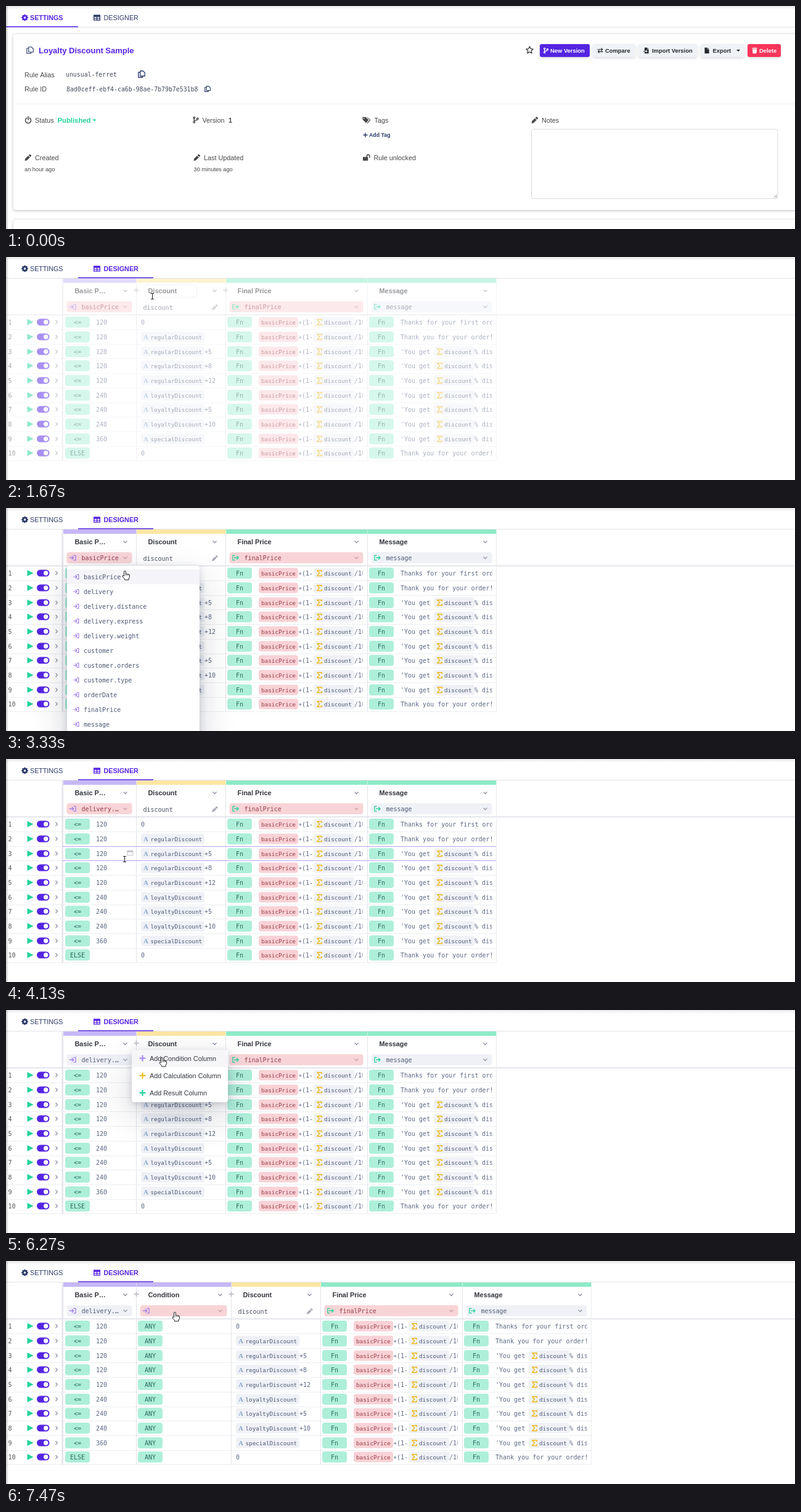
These frames come from a looping animation (1280x363 px, 8000 ms). An HTML page with a canvas:

```html
<!DOCTYPE html>
<html lang="en">
<head>
<meta charset="utf-8">
<title>Rule designer</title>
<style>
html, body { margin: 0; width: 100%; height: 100%; overflow: hidden; background: #fff; }
canvas { display: block; width: 100%; height: 100%; }
</style>
</head>
<body>
<canvas id="stage" width="1280" height="363"></canvas>
<script>
const c = document.getElementById('stage').getContext('2d');
const SANS = '"Liberation Sans", Arial, sans-serif';
const MONO = '"DejaVu Sans Mono", monospace';
const PURPLE = '#5525e2', NAVY = '#2b3a67', GREEN = '#22d39a', INK = '#474747', CODE = '#5c6784';
const LOOP = 8000, FPS = 15;

// Icons on a 16 unit grid: [filled path, stroked path]
const ICONS = {
  table: ['M0 1h16v14H0z M2 6h5v3H2z M9 6h5v3H9z M2 10.500h5v2.500H2z M9 10.500h5v2.500H9z', ''],
  clone: ['', 'M5 1h6l4 4v7H5z M5 4H1v11h9v-3'],
  branch: ['', 'M6 3a2 2 0 1 0-4 0a2 2 0 1 0 4 0 M6 13a2 2 0 1 0-4 0a2 2 0 1 0 4 0 M14 5a2 2 0 1 0-4 0a2 2 0 1 0 4 0 M4 5v6 M12 7c0 3-8 1-8 4'],
  star: ['', 'M8 1l2.100 4.600 5 .6-3.700 3.400 1 5L8 12.100 3.600 14.600l1-5L.9 6.200l5-.6z'],
  swap: ['', 'M1 5h13 M11 2l3 3-3 3 M15 11H2 M5 8l-3 3 3 3'],
  load: ['M3 0h7v5h4v11H3v-5h4v3l4-4-4-4v3H3z M11 0l3 4h-3z M0 9h3v2H0z', ''],
  file: ['M2 0h7v5h5v11H2z M10 0l4 4h-4z', ''],
  trash: ['M1 1h4l1-1h4l1 1h4v2H1z M2 4h12l-1 12H3z', ''],
  power: ['', 'M5 3a6 6 0 1 0 6 0 M8 0v7'],
  pencil: ['M0 16l1-5 7-7 4 4-7 7z M9 3l2-2q1-1 2 0l2 2q1 1 0 2l-2 2z', ''],
  tags: ['M0 2h6l6 6-5 6-7-7z M2 5a1 1 0 1 0 2 0a1 1 0 1 0-2 0z M8 2h1l7 6-6 7-1-1 5-6z', ''],
  unlock: ['M0 7h11v8H0z', 'M8.500 7V5a3 3 0 0 1 6 0v3'],
  input: ['', 'M0 8h9 M6 4l4 4-4 4 M10 2h5v12h-5'],
  output: ['', 'M6 2H1v12h5 M5 8h10 M11 4l4 4-4 4'],
  calendar: ['M1 2h14v4H1z', 'M1 2h14v12H1z'],
  sigma: ['', 'M14 4V1H2l6 7-6 7h12v-3'],
};
for (const k in ICONS) ICONS[k] = ICONS[k].map(d => new Path2D(d));

function icon(name, x, y, size, color, weight = 2) {
  const [fill, line] = ICONS[name];
  c.save();
  c.translate(x - size / 2, y - size / 2);
  c.scale(size / 16, size / 16);
  c.fillStyle = c.strokeStyle = color;
  c.lineWidth = weight;
  c.lineJoin = c.lineCap = 'round';
  c.fill(fill, 'evenodd');
  c.stroke(line);
  c.restore();
}

function text(s, x, y, color = INK, size = 10.8, weight = 400, align = 'left', font = SANS) {
  c.font = `${weight} ${size}px ${font}`;
  c.fillStyle = color;
  c.textAlign = align;
  c.fillText(s, x, y);
}
const bold = (s, x, y, color, size = 10.8) => text(s, x, y, color, size, 700);
const mono = (s, x, y, color = CODE, size = 10, align) => text(s, x, y, color, size, 400, align, MONO);

function box(x, y, w, h, color) {
  c.fillStyle = color;
  c.fillRect(x, y, w, h);
}

function pill(x, y, w, h, color, r = 4) {
  c.fillStyle = color;
  c.beginPath();
  c.roundRect(x, y, w, h, r);
  c.fill();
}

function frame(x, y, w, h, color, r = 3) {
  c.strokeStyle = color;
  c.lineWidth = 1;
  c.beginPath();
  c.roundRect(x, y, w, h, r);
  c.stroke();
}

function raised(x, y, w, h, color, blur, dy, shade, r) {
  c.save();
  c.shadowColor = `rgba(30,35,60,${shade})`;
  c.shadowBlur = blur;
  c.shadowOffsetY = dy;
  pill(x, y, w, h, color, r);
  c.restore();
}

function panel(x, y, w, h) {
  raised(x, y, w, h, '#fff', 60, 22, .2, 4);
  raised(x, y, w, h, '#fff', 12, 3, .2, 4);
}

function line(points, color, width = 1) {
  c.strokeStyle = color;
  c.lineWidth = width;
  c.beginPath();
  points.forEach(([x, y], i) => i ? c.lineTo(x, y) : c.moveTo(x, y));
  c.stroke();
}

const caret = (x, y, color) => line([[x - 3, y - 1.5], [x, y + 1.5], [x + 3, y - 1.5]], color, 1.3);

function plus(x, y, r, color, width = 2) {
  line([[x - r, y], [x + r, y]], color, width);
  line([[x, y - r], [x, y + r]], color, width);
}

function wedge(x, y, color) {
  c.fillStyle = color;
  c.beginPath();
  c.moveTo(x - 3, y - 1.5);
  c.lineTo(x + 3, y - 1.5);
  c.lineTo(x, y + 1.8);
  c.fill();
}

function gear(x, y, color) {
  for (let i = 0; i < 4; i++) {
    const a = i * Math.PI / 4, dx = Math.cos(a) * 5.3, dy = Math.sin(a) * 5.3;
    line([[x - dx, y - dy], [x + dx, y + dy]], color, 2.3);
  }
  c.fillStyle = color;
  c.beginPath();
  c.arc(x, y, 4.2, 0, 7);
  c.fill();
  c.fillStyle = '#fff';
  c.beginPath();
  c.arc(x, y, 1.7, 0, 7);
  c.fill();
}

const clamp = v => Math.max(0, Math.min(1, v));
const mix = (a, b, k) => `rgb(${a.map((v, i) => Math.round(v + (b[i] - v) * k))})`;
const RED = [248, 212, 215], GREY = [239, 241, 246];

// Pointer path: [tick, x, y, shape]
const PATH = [
  [1, 1272, 352, 'arrow'], [10, 240, 120, 'arrow'], [11, 180, 62, 'arrow'], [13, 203, 33, 'arrow'],
  [14, 188, 20, 'hand'], [16, 168, 12, 'hand'], [20, 168, 12, 'arrow'], [24, 237, 64, 'beam'],
  [27, 237, 64, 'beam'], [33, 203, 79, 'hand'], [36, 194, 82, 'hand'], [47, 194, 82, 'hand'],
  [56, 192, 158, 'hand'], [62, 192, 163, 'beam'], [68, 192, 163, 'beam'], [70, 192, 168, 'beam'],
  [74, 222, 122, 'beam'], [77, 216, 66, 'arrow'], [79, 211, 54, 'hand'], [85, 211, 54, 'hand'],
  [94, 253, 77, 'hand'], [96, 254, 78, 'hand'], [97, 253, 77, 'hand'], [99, 253, 77, 'hand'],
  [112, 274, 83, 'hand'],
];

function pointerAt(n) {
  let i = PATH.length - 1;
  while (i > 0 && PATH[i][0] > n) i--;
  const [t, x, y, shape] = PATH[i], next = PATH[i + 1];
  if (!next) return { x, y, shape };
  const k = clamp((n - t) / (next[0] - t)), e = k * k * (3 - 2 * k);
  return { x: x + (next[1] - x) * e, y: y + (next[2] - y) * e, shape };
}

const ARROW = new Path2D('M0 0v13l3-2.800 2 4.600 2-.9-2-4.400h4.200z');
const HAND = new Path2D('M-1.500 1Q0-.5 1.300 1V5.500Q2.500 4.600 3.600 5.800 5 5 5.900 6.400 7.300 6 7.500 7.500V10.500L6 13V15H-.5V13.500L-4 9.500Q-4.500 7.300-2.500 8L-1.500 9z');

function drawPointer({ x, y, shape }) {
  c.save();
  c.translate(Math.round(x), Math.round(y));
  if (shape === 'beam') {
    line([[-2, -4.5], [3, -4.5]], '#222');
    line([[-2, 4.5], [3, 4.5]], '#222');
    line([[.5, -4.5], [.5, 4.5]], '#222');
  } else {
    const path = shape === 'hand' ? HAND : ARROW;
    c.fillStyle = '#fff';
    c.strokeStyle = '#222';
    c.lineWidth = 1;
    c.fill(path);
    c.stroke(path);
    if (shape === 'hand') {
      for (const dx of [1.3, 3.6, 5.8]) line([[dx, 5.5], [dx, 8]], '#333', .8);
    }
  }
  c.restore();
}

function drawTabs(designer, hover) {
  if (hover) box(117, 4, 122, 29, '#f7f7f9');
  box(0, 34, 1280, 1, '#e2e3e6');
  const [a, b] = designer ? [NAVY, PURPLE] : [PURPLE, NAVY];
  gear(30.5, 19, a);
  text('SETTINGS', 39, 23, a, 10.7, designer ? 400 : 700);
  icon('table', 147.5, 19, 11, b);
  text('DESIGNER', 158.5, 23, b, 10.8, designer ? 700 : 400);
  box(designer ? 117 : 0, 33, designer ? 122 : 117, 1.5, PURPLE);
}

function drawEdges() {
  let g = c.createLinearGradient(0, 0, 0, 6);
  g.addColorStop(0, 'rgba(0,0,0,.09)');
  g.addColorStop(1, 'rgba(0,0,0,0)');
  box(0, 0, 1280, 6, g);
  g = c.createLinearGradient(0, 0, 4, 0);
  g.addColorStop(0, 'rgba(0,0,0,.22)');
  g.addColorStop(1, 'rgba(0,0,0,0)');
  box(0, 0, 4, 363, g);
}

function button(x, w, label, tx, name, ix, bg = '#eff2f6', fg = '#24272e') {
  raised(x, 62, w, 21, bg, 4, 2, .16, 3);
  icon(name, ix, 72.5, 9.5, fg);
  bold(label, tx, 76, fg, 9.4);
}

function drawSettings() {
  raised(12, 46, 1290, 286, '#fff', 5, 1, .3, 4);
  raised(12, 348, 1290, 40, '#fff', 5, 1, .3, 4);
  icon('clone', 39, 72, 12, NAVY, 1.5);
  bold('Loyalty Discount Sample', 53, 77, PURPLE, 13);
  icon('star', 849.5, 71.5, 13, '#333', 1.5);
  button(866, 81, 'New Version', 883, 'branch', 876, PURPLE, '#fff');
  button(952, 69, 'Compare', 972, 'swap', 964);
  button(1026, 95, 'Import Version', 1048, 'load', 1039);
  button(1127, 71, 'Export', 1146.5, 'file', 1137);
  wedge(1188, 72.5, '#24272e');
  button(1203, 54, 'Delete', 1222, 'trash', 1214.5, '#f8355b', '#fff');

  text('Rule Alias', 30, 116);
  mono('unusual-ferret', 97, 115, '#454b5c', 9.85);
  icon('clone', 220, 111, 12, NAVY, 1.7);
  text('Rule ID', 30, 139);
  mono('8ad0ceff-ebf4-ca6b-98ae-7b79b7e531b8', 98, 138.5, '#454b5c', 9.85);
  icon('clone', 327, 135, 10, NAVY, 1.8);
  box(12, 159, 1268, 1, '#f0f0f2');

  icon('power', 36, 186, 12, INK);
  text('Status', 47, 190);
  bold('Published', 83.5, 190, GREEN, 11.3);
  wedge(143.5, 186, GREEN);
  icon('branch', 308, 185.5, 11, INK);
  text('Version', 318.5, 189.5);
  bold('1', 361, 189.5, INK);
  icon('tags', 585, 185.5, 13, INK);
  text('Tags', 597.5, 189.5);
  plus(583, 210, 3.5, NAVY, 1.5);
  bold('Add Tag', 589, 213, NAVY, 8.8);
  icon('pencil', 858, 185.5, 11, INK);
  text('Notes', 869, 189.5);
  frame(852.5, 200.5, 399.5, 113, '#d9dade');
  line([[1246, 312], [1251, 307]], '#888');
  line([[1249, 312], [1251, 310]], '#888');

  icon('pencil', 36, 246.5, 11, INK);
  text('Created', 47, 250.5);
  text('an hour ago', 30, 268.5, INK, 9.25);
  icon('pencil', 310, 246.5, 11, INK);
  text('Last Updated', 321, 250.5);
  text('30 minutes ago', 304.5, 268.5, INK, 9.25);
  icon('unlock', 585, 246.5, 12, INK);
  text('Rule unlocked', 596.5, 250.5);
}

const ROW = 23.7, TOP = 94.3;
const DISCOUNTS = ['0', 'regular', 'regular+5', 'regular+8', 'regular+12', 'loyalty', 'loyalty+5', 'loyalty+10', 'special', '0'];

function tag(label, x, y) {
  pill(x, y - 9, 40, 18, '#aeefd9');
  mono(label, x + 20, y + 3.6, '#2d6b60', 10, 'center');
}

function sumChip(x, y) {
  pill(x, y - 8.5, 66, 17, '#eff1f6');
  icon('sigma', x + 9.5, y, 10, '#efb91c', 2.4);
  mono('discount', x + 17, y + 3.5, '#4d5875', 9.3);
}

function clipTo(x, y, w, draw) {
  c.save();
  c.beginPath();
  c.rect(x, y - 11, w, 22);
  c.clip();
  draw();
  c.restore();
}

const CELLS = {
  price(x, y, i) {
    if (i === 9) return tag('ELSE', x + 4, y);
    tag('<=', x + 4, y);
    mono(i < 5 ? '120' : i < 8 ? '240' : '360', x + 54, y + 3.6);
  },
  any: (x, y) => tag('ANY', x + 3, y),
  discount(x, y, i) {
    const [word, extra] = DISCOUNTS[i].split('+');
    if (word === '0') return mono('0', x + 8, y + 3.6);
    pill(x + 8, y - 8.5, 103, 17, '#eff1f6');
    text('A', x + 12, y + 4, '#8ba6cf', 11, 700, 'left', '"Liberation Serif", serif');
    mono(word + 'Discount', x + 23.5, y + 3.5, '#4d5875', 9.25);
    if (extra) mono('+' + extra, x + 111, y + 3.6);
  },
  final(x, y) {
    tag('Fn', x + 3, y);
    clipTo(x + 50, y, 172.5, () => {
      pill(x + 54, y - 8.5, 64, 17, '#f8d2d6');
      mono('basicPrice', x + 58, y + 3.5, '#9c3c48', 9.3);
      mono('∗(1-', x + 118, y + 3.6);
      sumChip(x + 143, y);
      mono('/100)', x + 209, y + 3.6);
    });
  },
  message(x, y, i) {
    tag('Fn', x + 3, y);
    clipTo(x + 50, y, 152.5, () => {
      if (i === 0) return mono('Thanks for your first order!', x + 54, y + 3.6);
      if (i === 1 || i === 9) return mono('Thank you for your order!', x + 54, y + 3.6);
      mono("'You get", x + 54, y + 3.6);
      sumChip(x + 108, y);
      mono('% discount', x + 174, y + 3.6);
    });
  },
};

function columns(n) {
  const added = n >= 100, dx = added ? 154 : 0;
  const price = { x: 92, w: 119, bar: '#c6b7f6', name: 'Basic P…', cell: 'price', icon: 'input',
    field: n < 62 ? 'basicPrice' : 'delivery.…', red: 1 - clamp((n - 62) / 3) };
  const cond = { x: 211, w: 154, bar: '#c6b7f6', name: 'Condition', cell: 'any', icon: 'input',
    field: '', red: clamp((n - 99) / 3) };
  const rest = [
    { x: 211 + dx, w: 145, bar: '#fde6a3', name: 'Discount', cell: 'discount', field: 'discount' },
    { x: 356 + dx, w: 230, bar: '#8eeac8', name: 'Final Price', cell: 'final', icon: 'output', field: 'finalPrice', red: 1 },
    { x: 586 + dx, w: 209, bar: '#8eeac8', name: 'Message', cell: 'message', icon: 'output', field: 'message', red: 0 },
  ];
  return added ? [price, cond, ...rest] : [price, ...rest];
}

function drawHead(col) {
  const { x, w, red } = col, right = x + w;
  box(x + 1, 35, w - .5, 7, col.bar);
  bold(col.name, x + 19.5, 59, '#33363d', 10.9);
  caret(right - 17.5, 55, '#8b90a0');
  if (!col.icon) {
    mono(col.field, x + 11.5, 85.5, '#4b5162', 10);
    icon('pencil', right - 17, 81.5, 10, '#a9abb2');
    return;
  }
  pill(x + 6.5, 72, w - 13, 18, mix(GREY, RED, red));
  icon(col.icon, x + 16.5, 81, 10.5, col.icon === 'input' ? '#a17fe8' : GREEN);
  mono(col.field, x + 30.5, 84.5, mix([83, 92, 116], [150, 62, 74], red), 10);
  caret(right - 17.5, 81, mix([150, 155, 170], [200, 160, 166], red));
}

function drawRow(i, cols) {
  const y = Math.round(TOP + ROW * (i + .5));
  mono(i + 1, 3.5, y + 3.8, '#555');
  c.fillStyle = GREEN;
  c.beginPath();
  c.moveTo(34.500, y - 5);
  c.lineTo(44.500, y);
  c.lineTo(34.500, y + 5);
  c.fill();
  pill(50, y - 5.5, 20.5, 11, PURPLE, 5.5);
  pill(61, y - 3.7, 7.4, 7.4, '#fff', 3.7);
  line([[80.5, y - 3], [83.5, y], [80.5, y + 3]], '#8b90a0', 1.2);
  for (const col of cols) CELLS[col.cell](col.x, y, i);
}

function drawDesigner(n, p) {
  const cols = columns(n), last = cols[cols.length - 1], right = last.x + last.w;
  const bottom = TOP + ROW * 10;
  for (let i = 1; i <= 10; i++) box(0, Math.round(TOP + ROW * i), right, 1, '#eceef2');
  box(0, 93.500, 1280, 1.5, '#dddfe5');
  for (const { x } of cols) box(x, 42, 1, bottom - 42, '#e2e4ea');
  box(right, 42, 1, bottom - 42, '#e9ebef');
  box(90.500, 35, 2, bottom - 35, '#e4e4ea');
  cols.forEach(drawHead);
  for (let i = 0; i < 10; i++) drawRow(i, cols);

  const popup = n >= 40 && n < 62, menu = n >= 83 && n < 100;
  const over = cols.find(o => p.x >= o.x && p.x < o.x + o.w);
  if (menu) plus(211.5, 54, 4, '#c3c5cc');
  else if (over && p.y > 40 && p.y < TOP) {
    plus(over.x + .5, 54, 4, '#c3c5cc');
    plus(over.x + over.w + .5, 54, 4, '#c3c5cc');
    if (p.y > 44 && p.y < 66 && p.x > over.x + 14) frame(over.x + 14.5, 45.5, 84, 20, '#e0e1e6');
  }
  const row = Math.floor((p.y - TOP) / ROW);
  if (row >= 0 && over && !popup && !menu) {
    const y = TOP + ROW * row;
    for (const e of [y, y + ROW]) box(92, Math.round(e), right - 92, 1, '#b8a3ee');
    if (over === cols[0]) icon('calendar', 201.5, y + ROW / 2 - .5, 10, '#bfc1c9', 1.5);
  }
}

const FIELDS = ['basicPrice', 'delivery', 'delivery.distance', 'delivery.express', 'delivery.weight',
  'customer', 'customer.orders', 'customer.type', 'orderDate', 'finalPrice', 'message'];

function drawFields(p) {
  panel(99, 94, 215, 290);
  FIELDS.forEach((name, i) => {
    const y = 112 + i * 24;
    if (Math.abs(p.y - y) < 12) box(99, y - 12, 215, 24, '#f5f5f9');
    icon('input', 114, y, 9, '#a17fe8');
    mono(name, 126, y + 3.6, '#4d5875', 10);
  });
}

function drawMenu(alpha, p) {
  c.globalAlpha = alpha;
  panel(204, 65, 156, 85);
  if (p.y > 66) pill(204, 65, 156, 28, '#f6f6f9', [4, 4, 0, 0]);
  [['Condition', '#a98bf0'], ['Calculation', '#efbf1f'], ['Result', GREEN]].forEach(([kind, color], i) => {
    const y = 78.5 + i * 28.2;
    plus(221.5, y, 5, color, 2.2);
    text(`Add ${kind} Column`, 233, y + 4, '#33363d');
  });
  c.globalAlpha = 1;
}

function draw(n) {
  const p = pointerAt(n), designer = n >= 21;
  box(0, 0, 1280, 363, '#fff');
  if (!designer) drawSettings();
  else if (n > 24) drawDesigner(n, p);
  if (n === 25) box(0, 34, 1280, 329, 'rgba(255,255,255,.49)');
  drawTabs(designer, !designer && n > 0 && p.x > 117 && p.x < 239 && p.y < 33);
  drawEdges();
  if (n >= 40 && n < 62) drawFields(p);
  if (n >= 83 && n < 102) drawMenu(Math.min(clamp((n - 82) / 3), clamp((102 - n) / 3)), p);
  if (n > 0) drawPointer(p);
}

function tick(now) {
  draw(Math.floor((now % LOOP) * FPS / 1000 + .1) % (LOOP * FPS / 1000));
  requestAnimationFrame(tick);
}
draw(0);
requestAnimationFrame(tick);
</script>
</body>
</html>
```
